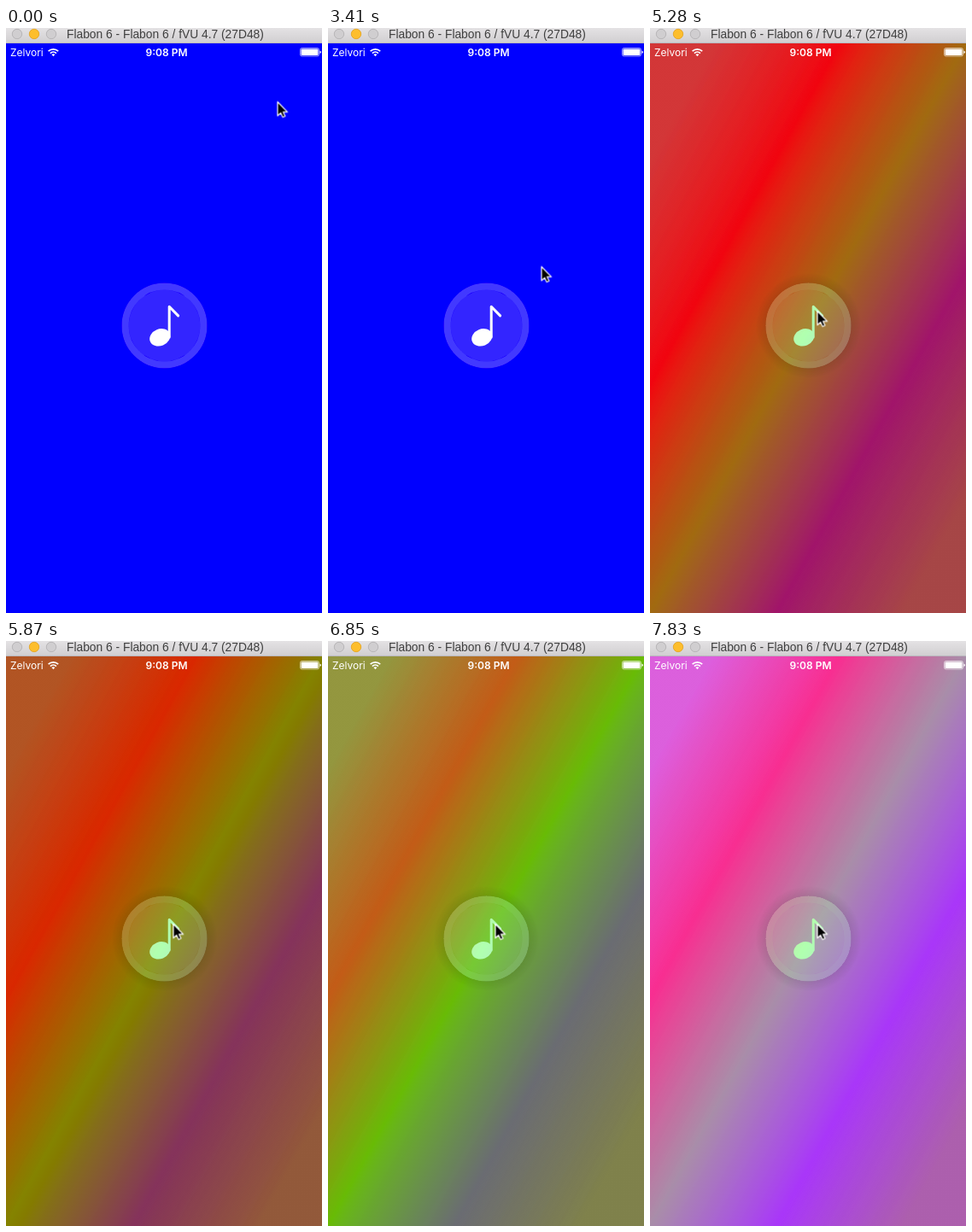
Write an HTML page that moves like this. It is 370 px wide and 685 px high and loops after 8000 ms.

```html
<!DOCTYPE html>
<html lang="en">
<head>
<meta charset="utf-8">
<title>Party button</title>
<style>
  html, body { margin: 0; width: 100%; height: 100%; overflow: hidden; }
  #stage { position: relative; width: 370px; height: 685px; overflow: hidden; }
  #screen, #rainbow { position: absolute; left: 0; width: 370px; height: 667px; }
  #screen { top: 18px; background: #00f; filter: url(#display); }
  #rainbow {
    top: 0;
    opacity: 0;
    background:
      radial-gradient(circle at 185.5px 330.5px,
        transparent 50px, rgba(0, 0, 0, .09) 50px, transparent 62px),
      linear-gradient(to bottom right,
        rgba(128, 128, 128, .2) 10%,
        rgba(255, 0, 0, .4) 30%,
        rgba(0, 255, 0, .3) 50%,
        rgba(0, 0, 255, .3) 70%,
        rgba(102, 102, 102, .5) 90%);
  }
  #button { position: absolute; left: 135px; top: 280px; }
  #chrome { position: absolute; left: 0; top: 0; }
  #cursor { position: absolute; left: 0; top: 0; overflow: visible; }
  .title { font: 13.8px "Liberation Sans", Arial, sans-serif; fill: #3f3f3f; }
  .status { font: 12px Inter, Roboto, sans-serif; fill: #fff; }
  .clock { font-weight: 600; text-anchor: middle; }
</style>
</head>
<body>
<div id="stage">
  <div id="screen">
    <svg id="button" width="101" height="101" viewBox="135 298 101 101">
      <circle cx="185.5" cy="348.5" r="42" fill="#fff" fill-opacity=".2"/>
      <circle cx="185.5" cy="348.5" r="46" fill="none" stroke="#fff" stroke-opacity=".26" stroke-width="8"/>
      <ellipse cx="180.2" cy="362.3" rx="12.3" ry="9.8" transform="rotate(-22 180.2 362.3)" fill="#fff"/>
      <path d="M191.2 362V326.3L201.6 336.9" fill="none" stroke="#fff" stroke-width="3" stroke-linecap="round" stroke-linejoin="round"/>
    </svg>
    <div id="rainbow"></div>
  </div>

  <svg id="chrome" width="370" height="685">
    <defs>
      <linearGradient id="bar" x1="0" y1="0" x2="0" y2="1">
        <stop offset="0" stop-color="#e4e2e4"/>
        <stop offset="1" stop-color="#d0ced0"/>
      </linearGradient>
      <!-- display profile: slightly wider primaries -->
      <filter id="display" x="0" y="0" width="1" height="1">
        <feColorMatrix values="
          1.02 -.02 0 0 0
          -.01 1.025 -.015 0 0
          -.005 -.035 1.04 0 0
          0 0 0 1 0"/>
      </filter>
    </defs>
    <rect width="370" height="18" fill="url(#bar)"/>
    <rect y="17" width="370" height="1" fill="#b9b7bd"/>
    <g stroke-width="1">
      <circle cx="13" cy="7" r="5.7" fill="#d0ced0" stroke="#b8b6b8"/>
      <circle cx="33" cy="7" r="5.7" fill="#fdbe2d" stroke="#e6a92c"/>
      <circle cx="53" cy="7" r="5.7" fill="#d0ced0" stroke="#b8b6b8"/>
    </g>
    <text class="title" x="71" y="12">Flabon 6 - Flabon 6 / fVU 4.7 (27D48)</text>

    <text class="status" x="5" y="32.5">Zelvori</text>
    <g fill="none" stroke="#fff" stroke-width="1.7">
      <path d="M49.6 27.2A8.2 8.2 0 0 1 61.2 27.2"/>
      <path d="M51.9 29.6A5 5 0 0 1 58.9 29.6"/>
    </g>
    <path d="M53.4 31.1A2.9 2.9 0 0 1 57.4 31.1L55.4 33.2Z" fill="#fff"/>
    <text class="status clock" x="188" y="32.5">9:08 PM</text>
    <rect x="344.5" y="23.5" width="22" height="9.5" rx="2" fill="none" stroke="#fff" stroke-opacity=".6"/>
    <rect x="345.5" y="24.5" width="20" height="7.5" rx="1" fill="#fff"/>
    <path d="M367.5 26.5Q369 27 369 28.3T367.5 30Z" fill="#fff"/>
  </svg>

  <svg id="cursor" width="13" height="19">
    <path d="M.5 0V16.3L4.2 13L6.6 18L9.4 16.8L7.1 11.9H12Z" fill="#000" stroke="#fff" stroke-width="1.2" stroke-linejoin="round"/>
  </svg>
</div>

<script>
const LOOP = 8000;
const $ = id => document.getElementById(id);

// Plays a list of [time, value] pairs as hard changes.
function play(id, prop, steps) {
  const frames = steps.map(([t, v]) => ({ offset: t / LOOP, [prop]: v, easing: 'step-end' }));
  frames.push({ offset: 1, [prop]: steps[steps.length - 1][1] });
  $(id).animate(frames, { duration: LOOP, iterations: Infinity });
}

// 48-bit linear congruential generator, values in 0..1
let seed = 0x1234ABCD330En;
function rand() {
  seed = (seed * 0x5DEECE66Dn + 11n) & 0xFFFFFFFFFFFFn;
  return Number(seed) / 2 ** 48;
}
const channel = () => Math.round(rand() * 255);
const randomColor = () => `rgb(${channel()}, ${channel()}, ${channel()})`;

const flashes = [4550, 4690, 4930, 5070, 5280, 5520, 5660, 5870, 6070,
  6250, 6460, 6640, 6850, 7060, 7230, 7440, 7650, 7830];

const at = ([x, y]) => `translate(${x + .5}px, ${y + .5}px)`;
const smooth = p => p * p * (3 - 2 * p);

// Pointer move in n steps; the first step shows at t0, the last at t1.
function move(from, to, t0, t1, n) {
  return Array.from({ length: n }, (_, i) => {
    const p = smooth((i + 1) / n);
    const pos = from.map((a, k) => Math.round(a + (to[k] - a) * p));
    return [t0 + (t1 - t0) * i / (n - 1), at(pos)];
  });
}

const start = [317, 86], rest = [251, 277], press = [195, 331];

play('cursor', 'transform', [
  [0, at(start)],
  ...move(start, rest, 380, 920, 17),
  ...move(rest, press, 3410, 3620, 8)
]);
play('button', 'filter', [[0, 'none'], [4010, 'brightness(.55)'], [4340, 'none']]);
play('rainbow', 'opacity', [[0, 0], [4340, 1]]);
play('screen', 'backgroundColor', [[0, '#00f'], ...flashes.map(t => [t, randomColor()])]);
</script>
</body>
</html>
```
